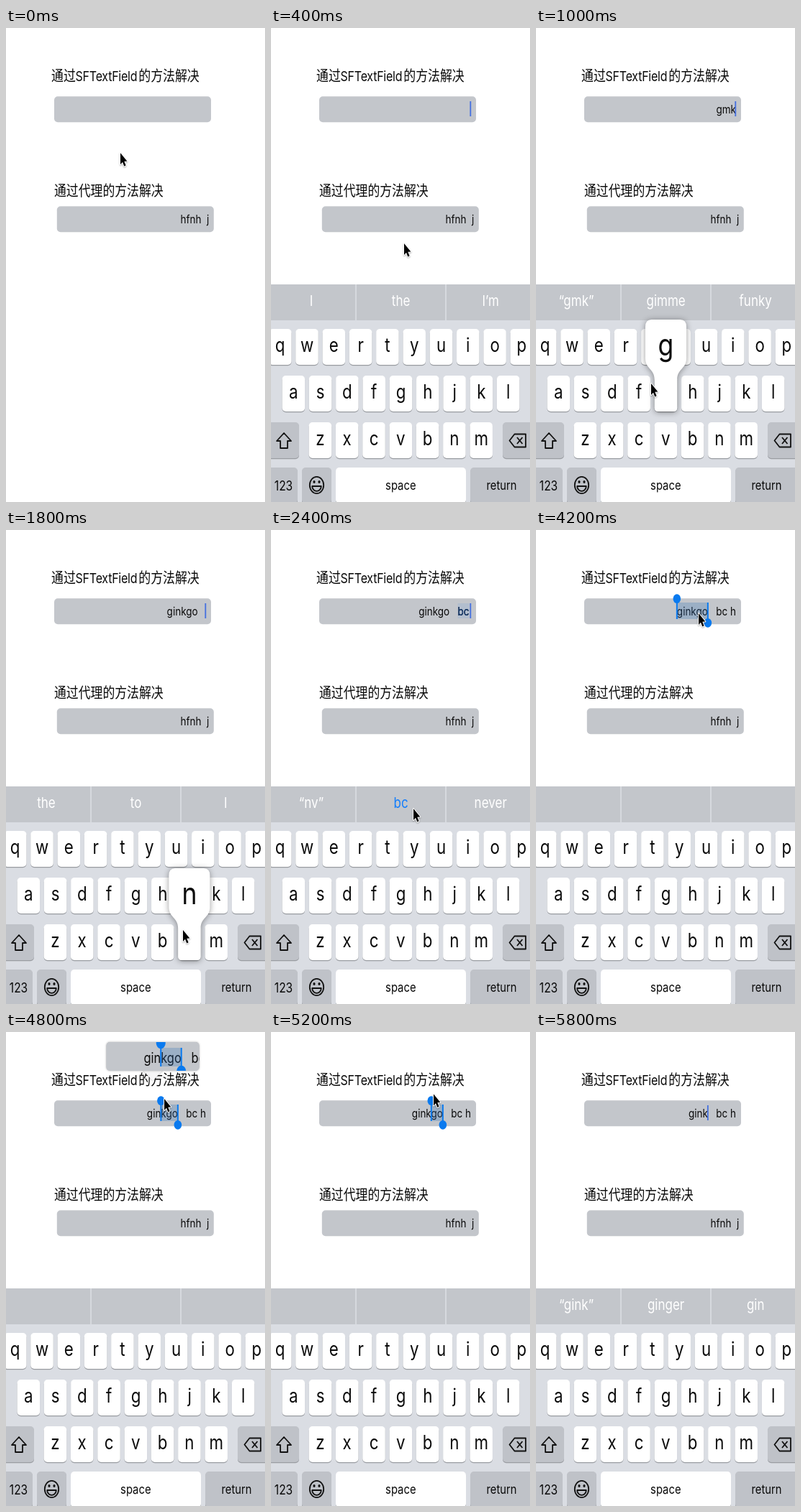
An HTML page with a canvas for the animation above (6000 ms loop, 360x660 px).

```html
<!DOCTYPE html>
<html lang="zh-CN">
<head>
<meta charset="utf-8">
<style>
html, body { margin: 0; width: 360px; height: 660px; overflow: hidden; background: #fff; }
canvas { display: block; }
</style>
</head>
<body>
<canvas id="stage" width="360" height="660"></canvas>
<script>
const ctx = document.getElementById('stage').getContext('2d');
const LOOP = 6000, STEP = 200;
const TALL = 1.2; // the whole screen is shown taller than wide
const FONT = 'Inter, "Noto Sans CJK SC", "Noto Sans CJK", sans-serif';
const GREY = '#c3c6cb', BLUE = '#0a7aef', CARET = '#4470e0', SELECT = 'rgba(50,110,180,.27)';
const PITCH = 37.3, KEY_W = 31.5, KEY_H = 50;
const SIZE = 13.5, EDGE = 278;

const ROWS = [['qwertyuiop', 12.7, 419], ['asdfghjkl', 31.3, 484], ['zxcvbnm', 68.4, 549]];
const KEYS = ROWS.flatMap(([letters, x, y]) =>
  [...letters].map((letter, i) => ({ letter, x: x + i * PITCH, y })));

// Each entry changes part of the state from its step on.
const CHANGES = [
  [0, { text: '', words: ['I', 'the', 'I’m'], edge: EDGE }],
  [2, { keyboard: true, caret: 0 }],
  [3, { text: 'g', words: ['“g”', 'good', 'get'] }],
  [4, { text: 'gm', words: ['“gm”', 'game', 'go'] }],
  [5, { text: 'gmk', words: ['“gmk”', 'gimme', 'funky'], pop: 'g' }],
  [6, { text: 'gmkg', words: ['“gmkg”', 'ginkgo', 'going'], pop: '' }],
  [7, { text: 'ginkgo ', words: ['the', 'to', 'I'] }],
  [8, { text: 'ginkgo   ' }],
  [9, { pop: 'n' }],
  [10, { text: 'ginkgo   n', pop: '', words: ['“n”', 'not', 'no'] }],
  [11, { text: 'ginkgo   nv', words: ['“nv”', 'bc', 'never'] }],
  [12, { text: 'ginkgo   bc', edge: 275.5, picked: true }],
  [13, { text: 'ginkgo   bc ', edge: EDGE, picked: false, words: ['the', 'to', 'I'] }],
  [14, { pop: 'h' }],
  [15, { text: 'ginkgo   bc h', pop: '', words: ['“h”', 'he', 'have'] }],
  [17, { caret: 7, words: ['“ginkgo”', 'ginger', 'gin'] }],
  [21, { select: [0, 6], words: ['', '', ''] }],
  [23, { select: [2, 6], lens: true }],
  [24, { select: [3, 6] }],
  [25, { select: [4, 6] }],
  [26, { lens: false }],
  [28, { text: 'gink   bc h', select: null, words: ['“gink”', 'ginger', 'gin'] }]
];

// Pointer way points: step, x, y
const POINTER = [
  [0, 159, 174], [1, 215, 112], [2, 185, 300], [3, 172, 495], [4, 290, 560], [5, 160, 495],
  [6, 168, 500], [7, 180, 630], [8, 180, 630], [9, 246, 557], [11, 180, 565], [12, 198, 388],
  [14, 212, 500], [15, 212, 500], [17, 232, 120], [18, 230, 118], [21, 226, 116],
  [22, 197, 96], [24, 220, 93], [25, 226, 93], [27, 226, 80]
];

function pointerAt(step) {
  const i = POINTER.findIndex(p => p[0] >= step);
  if (i < 0) return null;
  const b = POINTER[i], a = POINTER[i - 1] || b;
  const k = (step - a[0]) / (b[0] - a[0] || 1);
  return [a[1] + (b[1] - a[1]) * k, a[2] + (b[2] - a[2]) * k];
}

function setFont(size, weight = 400) {
  ctx.font = `${weight} ${size}px ${FONT}`;
}

function write(text, x, y, size, { align = 'left', color = '#0b0b0b', weight, spacing = 0 } = {}) {
  ctx.save();
  ctx.translate(x, y);
  ctx.scale(1, TALL);
  setFont(size, weight);
  ctx.letterSpacing = spacing + 'px';
  ctx.textAlign = align;
  ctx.fillStyle = color;
  ctx.fillText(text, 0, 0);
  ctx.restore();
}

function widthOf(text, size) {
  setFont(size);
  return ctx.measureText(text).width;
}

function box(x, y, w, h, color, r = 5) {
  ctx.fillStyle = color;
  ctx.beginPath();
  ctx.roundRect(x, y, w, h, r);
  ctx.fill();
}

function bar(x, y, w, h, color) {
  ctx.fillStyle = color;
  ctx.fillRect(x, y, w, h);
}

function dot(x, y, r, color) {
  ctx.fillStyle = color;
  ctx.beginPath();
  ctx.ellipse(x, y, r, r * TALL, 0, 0, 7);
  ctx.fill();
}

function outline(points, color, width, close = true) {
  ctx.strokeStyle = color;
  ctx.lineWidth = width;
  ctx.lineJoin = 'round';
  ctx.beginPath();
  points.forEach(([x, y]) => ctx.lineTo(x, y));
  if (close) ctx.closePath();
  ctx.stroke();
}

function drawForm() {
  write('通过', 63, 73.5, 16.9);
  write('SFTextField', 96.6, 73.5, 16, { spacing: -0.25 });
  write('的方法解决', 184.3, 73.5, 16.9);
  write('通过代理的方法解决', 67, 233.5, 16.85);
  box(67, 95.3, 218, 36, GREY);
  box(70.8, 248.3, 218, 36, GREY);
  write('hfnh  j', 282.3, 272, SIZE, { align: 'right' });
}

function handles(x1, x2, top, bottom, r) {
  bar(x1, top, x2 - x1, bottom - top, SELECT);
  bar(x1 - 1, top, 2, bottom - top, BLUE);
  bar(x2 - 1, top, 2, bottom - top, BLUE);
  dot(x1, top - r, r, BLUE);
  dot(x2, bottom + r, r, BLUE);
}

function drawField(s) {
  const left = s.edge - widthOf(s.text, SIZE);
  const at = i => left + widthOf(s.text.slice(0, i), SIZE);
  if (s.picked) bar(at(9), 102, s.edge - at(9), 21, 'rgba(60,130,230,.12)');
  write(s.text, left, 119, SIZE);
  if (s.picked) write('bc', at(9), 119, SIZE, { color: '#123a73' });
  if (s.select) handles(at(s.select[0]), at(s.select[1]), 101, 124, 5.3);
  else if (s.caret !== undefined) {
    const x = s.caret ? at(s.text.indexOf(' ')) : 277.3;
    bar(x - 0.9, 102, 1.8, 21, CARET);
  }
}

function drawLens(s) {
  const size = 16.4, left = 191.5;
  const at = i => left + widthOf(s.text.slice(0, i), size);
  ctx.save();
  ctx.shadowColor = 'rgba(0,0,0,.3)';
  ctx.shadowBlur = 3;
  ctx.fillStyle = '#f6f6f7';
  ctx.beginPath();
  ctx.moveTo(190, 53);
  ctx.lineTo(218, 53);
  ctx.lineTo(204, 68);
  ctx.fill();
  box(139.5, 14, 129, 40, '#bfc2c7');
  ctx.restore();
  ctx.save();
  ctx.beginPath();
  ctx.roundRect(139.5, 14, 129, 40, 5);
  ctx.clip();
  bar(139, 14, 130, 40, GREY);
  write(s.text, left, 43, size);
  handles(at(s.select[0]), at(s.select[1]), 22, 48, 6.5);
  ctx.restore();
}

function key(x, y, w, color = '#fff') {
  box(x, y + 1.3, w, KEY_H, '#999ca1');
  box(x, y, w, KEY_H, color);
}

function drawIcons() {
  const ink = '#111', line = 1.8;
  outline([[18, 564], [28, 575], [23, 575], [23, 585], [13, 585], [13, 575], [8, 575]], ink, line);
  outline([[331.5, 574.5], [338.5, 565.5], [354, 565.5], [354, 583.5], [338.5, 583.5]], ink, line);
  outline([[342, 570], [349.5, 579]], ink, line, false);
  outline([[349.5, 570], [342, 579]], ink, line, false);
  ctx.lineWidth = line;
  ctx.beginPath();
  ctx.ellipse(63.5, 636.5, 9.7, 11.6, 0, 0, 7);
  ctx.stroke();
  ctx.beginPath();
  ctx.ellipse(63.5, 638, 6.3, 6.8, 0, 0, Math.PI);
  ctx.closePath();
  ctx.stroke();
  dot(60, 632, 1.6, ink);
  dot(67, 632, 1.6, ink);
}

function drawKeyboard(s) {
  bar(0, 357, 360, 303, '#dadde3');
  bar(0, 357, 360, 50, GREY);
  bar(117.3, 357, 1.4, 50, '#dfe1e5');
  bar(242.3, 357, 1.4, 50, '#dfe1e5');
  s.words.forEach((word, i) => write(word, 56 + i * 124.6, 387, 17,
    { align: 'center', color: s.picked && i === 1 ? '#147efb' : '#fff' }));

  for (const k of KEYS) {
    key(k.x - KEY_W / 2, k.y, KEY_W);
    write(k.letter, k.x, k.y + 32, 22.3, { align: 'center' });
  }
  key(-4, 549, 43, '#bfc2c8');
  key(322, 549, 43, '#bfc2c8');
  key(-4, 612, 41, '#bfc2c8');
  key(43, 612, 41, '#bfc2c8');
  key(90, 612, 181);
  key(277, 612, 88, '#bfc2c8');
  write('123', 17.5, 643.5, 15.5, { align: 'center' });
  write('space', 180.3, 642.5, 14.8, { align: 'center' });
  write('return', 320.5, 642.5, 14.8, { align: 'center' });
  drawIcons();
  if (s.pop) drawPop(KEYS.find(k => k.letter === s.pop));
}

function drawPop({ letter, x, y }) {
  ctx.save();
  ctx.translate(x, y);
  ctx.shadowColor = 'rgba(0,0,0,.4)';
  ctx.shadowBlur = 8;
  ctx.shadowOffsetY = 1;
  ctx.fillStyle = '#fff';
  ctx.beginPath();
  ctx.moveTo(-20, -78);
  ctx.lineTo(20, -78);
  ctx.quadraticCurveTo(28.5, -78, 28.5, -68);
  ctx.lineTo(28.5, -24);
  ctx.bezierCurveTo(28.5, -9, 15.7, -10, 15.7, 6);
  ctx.lineTo(15.7, 45);
  ctx.quadraticCurveTo(15.7, 50, 11, 50);
  ctx.lineTo(-11, 50);
  ctx.quadraticCurveTo(-15.7, 50, -15.7, 45);
  ctx.lineTo(-15.7, 6);
  ctx.bezierCurveTo(-15.7, -10, -28.5, -9, -28.5, -24);
  ctx.lineTo(-28.5, -68);
  ctx.quadraticCurveTo(-28.5, -78, -20, -78);
  ctx.fill();
  ctx.restore();
  write(letter, x, y - 28, 35.5, { align: 'center', weight: 400 });
}

function drawPointer([x, y]) {
  const shape = [[0, 0], [0, 16], [3, 12.8], [5.3, 18.5], [7.6, 17.3], [5.3, 11.8], [9.4, 11.6]]
    .map(([dx, dy]) => [x + dx, y + dy]);
  ctx.save();
  ctx.shadowColor = 'rgba(0,0,0,.3)';
  ctx.shadowBlur = 2;
  ctx.shadowOffsetY = 1;
  outline(shape, '#fff', 2);
  ctx.restore();
  ctx.fillStyle = '#000';
  ctx.fill();
}

function draw(time) {
  const step = Math.floor(time % LOOP / STEP);
  const state = Object.assign({}, ...CHANGES.filter(c => c[0] <= step).map(c => c[1]));
  bar(0, 0, 360, 660, '#fff');
  drawForm();
  drawField(state);
  if (state.keyboard) drawKeyboard(state);
  if (state.lens) drawLens(state);
  const pointer = pointerAt(step);
  if (pointer) drawPointer(pointer);
}

const start = performance.now();
function tick() {
  draw(performance.now() - start);
  requestAnimationFrame(tick);
}
tick();
</script>
</body>
</html>
```
